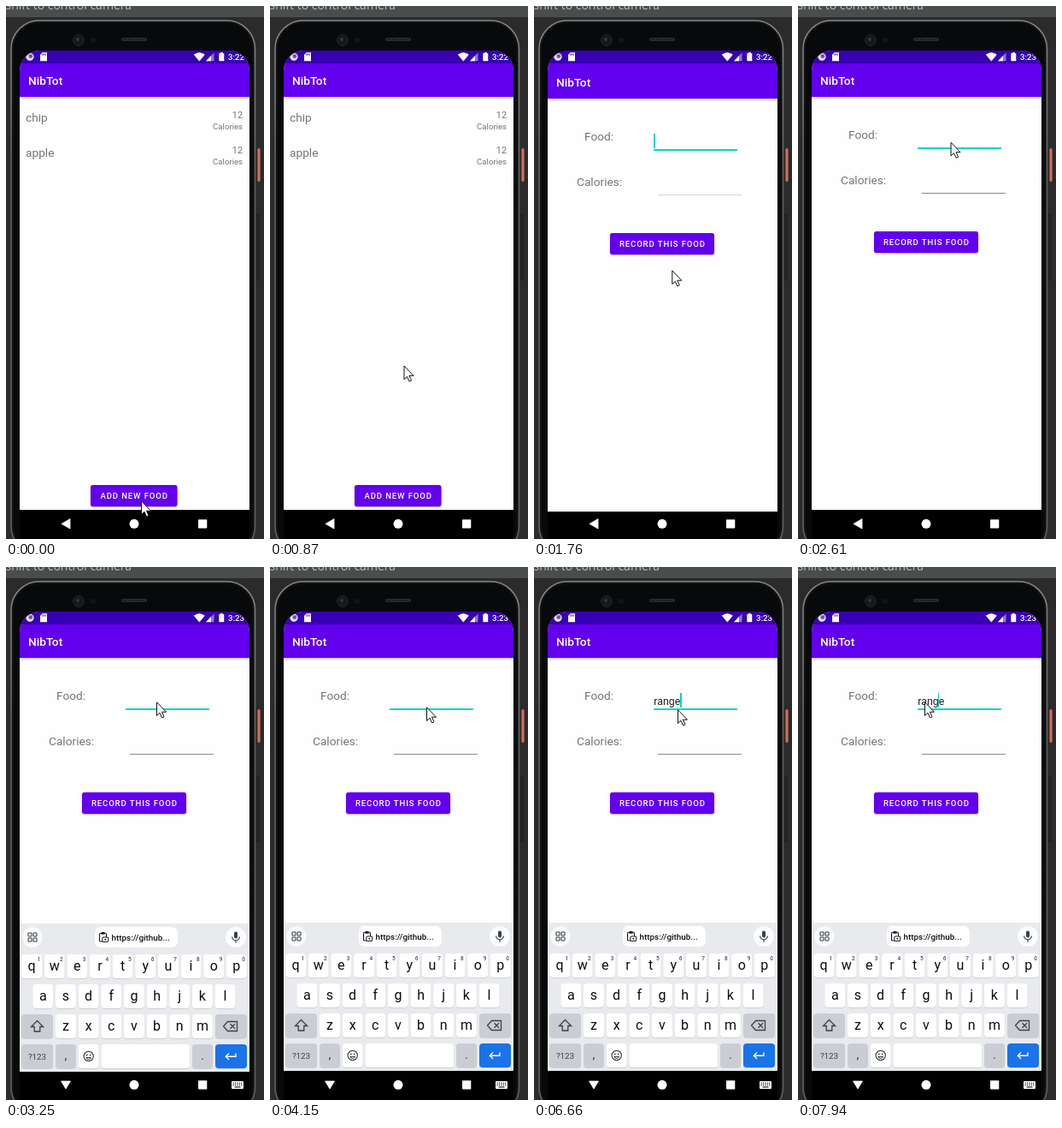
Animation of 302x622 px, one loop 8000 ms. Source, as an HTML page with a canvas:

```html
<!DOCTYPE html>
<html lang="en">
<head>
<meta charset="utf-8">
<title>Food log</title>
<style>
  html, body { margin: 0; width: 100%; height: 100%; overflow: hidden; background: #2b2b2b; }
  canvas { display: block; width: 302px; height: 622px; }
</style>
</head>
<body>
<canvas id="stage"></canvas>
<script>
const W = 302, H = 622, LOOP = 8000, STEP = 126;
const OPEN = 1640, KEYS = 3130, TYPE = 5340;
const canvas = document.getElementById('stage');
const dpr = window.devicePixelRatio || 1;
canvas.width = W * dpr;
canvas.height = H * dpr;
const c = canvas.getContext('2d');

const PURPLE = '#6200ee', DARK = '#3700b3', TEAL = '#03d6c1', GREY = '#747474';
const FONT = 'Roboto, "Noto Sans", sans-serif';

// Pointer stops: time, x, y
const stops = [[0, 158, 577], [240, 160, 585], [750, 181, 252], [1110, 136, 559],
  [1520, 136, 559], [1760, 161, 310], [2240, 183, 161], [2880, 176, 157], [3280, 176, 157],
  [3650, 183, 163], [6550, 183, 163], [6680, 168, 166], [7140, 147, 157], [LOOP, 148, 157]];

const snap = t => Math.floor((t + 30) / STEP) * STEP;

function tipAt(t) {
  const i = Math.max(1, stops.findIndex(p => p[0] > t));
  const [t0, x0, y0] = stops[i - 1], [t1, x1, y1] = stops[i];
  const k = (t - t0) / (t1 - t0), e = Math.sin(k * Math.PI / 2);
  return [x0 + (x1 - x0) * e, y0 + (y1 - y0) * e];
}

const settle = (age, from, tau) => Math.round(from * Math.exp(-Math.max(0, age) / tau));

// Half-second blink, restarted when typing ends.
function caretShown(t) {
  const since = t < TYPE ? OPEN : TYPE + 310;
  return Math.trunc((t - since) / 500) % 2 === 0;
}

function paint(fill, stroke, line) {
  if (fill) { c.fillStyle = fill; c.fill(); }
  if (stroke) { c.strokeStyle = stroke; c.lineWidth = line; c.stroke(); }
}

function rect(x, y, w, h, fill) {
  c.fillStyle = fill;
  c.fillRect(x, y, w, h);
}

function round(x, y, w, h, r, fill, stroke, line = 1) {
  c.beginPath();
  c.roundRect(x, y, w, h, r);
  paint(fill, stroke, line);
}

function disc(x, y, r, fill, stroke, line = 1) {
  c.beginPath();
  c.arc(x, y, r, 0, 7);
  paint(fill, stroke, line);
}

function poly(points, fill, stroke, line = 1) {
  c.beginPath();
  points.forEach(([x, y]) => c.lineTo(x, y));
  c.closePath();
  paint(fill, stroke, line);
}

function lines(d, stroke, line = 1) {
  c.strokeStyle = stroke;
  c.lineWidth = line;
  c.stroke(new Path2D(d));
}

function text(str, x, y, size, fill, { weight = 400, align = 'left', gap = 0, font = FONT } = {}) {
  c.font = `${weight} ${size}px ${font}`;
  c.letterSpacing = gap + 'px';
  c.textAlign = align;
  c.fillStyle = fill;
  c.fillText(str, x, y);
}

function shadowed(blur, dy, draw) {
  c.save();
  c.shadowColor = 'rgba(0,0,0,.32)';
  c.shadowBlur = blur * dpr;
  c.shadowOffsetY = dy * dpr;
  draw();
  c.restore();
}

function shifted(dy, draw) {
  c.save();
  c.translate(0, dy);
  draw();
  c.restore();
}

function desk(turning) {
  rect(0, 0, W, H, '#2b2b2b');
  rect(0, 0, W, 13, '#4a4d4e');
  const font = '"Open Sans", "Noto Sans", sans-serif';
  if (turning) text('camera with WASDQE keys, rotate with mouse', 0, 4, 14, '#bcbebf', { font });
  else text('shift to control camera', 147, 4, 14, '#bcbebf', { font, align: 'right' });
}

function phone() {
  round(293, 243, 4, 78, 2, '#222324');
  round(294.5, 166, 3, 39, 1.5, '#d9705c');
  const rim = c.createLinearGradient(0, 16, 0, 200);
  rim.addColorStop(0, '#858687');
  rim.addColorStop(1, '#5f6061');
  round(6, 17, 285.5, 623, 33, '#111213', rim, 1.6);
  round(9, 20, 279.5, 617, 30, '#08090a');
  disc(85, 40, 6.5, '#17181a', '#222427');
  disc(84, 39, 2, '#34363a');
  disc(102, 40, 3, '#141517');
  round(135, 37, 30, 4, 2, '#2b2c2e');
  for (let x = 137; x < 164; x += 3) rect(x, 38, 1, 2, '#111');
}

function navBar(keys) {
  rect(16, 588, 269, 34, '#000');
  const back = keys ? [[64.5, 600], [75.5, 600], [70, 609]] : [[75, 598.5], [75, 610], [65, 604.3]];
  poly(back, '#fff', '#fff', .8);
  disc(150, 604.3, 5.5, '#fff');
  round(225, 599.3, 10.3, 10.3, .8, '#fff');
  if (keys) {
    round(264, 600, 14, 9, 1, '#fff');
    for (let i = 0; i < 10; i++)
      rect(265.5 + i % 5 * 2.4, i < 5 ? 601.6 : 603.8, 1.2, 1.2, '#000');
    rect(267.5, 606.3, 7, 1.1, '#000');
  }
}

function statusBar(clock) {
  rect(16, 52, 269, 15, DARK);
  disc(28, 59.3, 4.6, '#e4dcf5');
  disc(28.8, 58.6, 2.3, '#6c4cc0');
  poly([[42.5, 54.3], [48, 54.3], [48, 64.2], [40, 64.2], [40, 57]], '#fff');
  for (let i = 0; i < 3; i++) rect(42.3 + i * 1.8, 55.5, .9, 2.2, DARK);
  c.beginPath();
  c.moveTo(226.3, 64.5);
  c.lineTo(219.8, 56.8);
  c.quadraticCurveTo(226.3, 51.8, 232.8, 56.8);
  c.closePath();
  paint('#fff');
  poly([[243.5, 54.5], [243.5, 64.3], [234, 64.3]], '#8f76d4');
  poly([[240, 58.1], [240, 64.3], [234, 64.3]], '#fff');
  round(249.3, 55, 6, 9.3, .8, '#fff');
  rect(251, 54, 2.6, 1.2, '#fff');
  text(clock, 260, 63, 9.6, '#fff', { weight: 500 });
}

function page() {
  rect(16, 52, 269, 536, '#fefefe');
  shadowed(3, 1, () => rect(12, 40, 277, 66, PURPLE));
  text('NibTot', 26, 92, 13.7, '#fff', { weight: 500 });
}

function button(label, x, y, w, press = 0) {
  shadowed(2 + press * 3, 1 + press * 1.5, () => round(x, y, w, 25, 2.7, PURPLE));
  if (press) {
    c.save();
    c.beginPath();
    c.roundRect(x, y, w, 25, 2.7);
    c.clip();
    rect(x, y, w, 25, `rgba(255,255,255,${.19 * press})`);
    disc(136 + 10 * press, y + 12, 42 * press, 'rgba(255,255,255,.24)');
    c.restore();
  }
  text(label, x + w / 2 + .4, y + 16.2, 9.6, '#fff', { weight: 500, align: 'center', gap: .86 });
}

function foodRow(name, y) {
  text(name, 23, y + 135, 13.7, GREY);
  text('12', 277, y + 131.3, 10.8, GREY, { align: 'right' });
  text('Calories', 277, y + 144.3, 9.6, GREY, { align: 'right' });
}

function listPage(s) {
  page();
  foodRow('chip', 0);
  foodRow('apple', 41);
  button('ADD NEW FOOD', 99, 559, 101.5, Math.min(1, Math.max(0, (s - 1140) / 360)));
}

function formPage(t) {
  page();
  text('Food:', 59, 155, 13.7, GREY);
  text('Calories:', 50, 208, 13.7, GREY);
  rect(140, 165, 98, 2, TEAL);
  rect(145, 218, 98, 1, t < OPEN + 240 ? '#d2d2d2' : '#8c8c8c');
  button('RECORD THIS FOOD', 89, 263, 122);

  const typed = 'range'.slice(0, Math.max(0, Math.floor((t - TYPE) / 96) + 1));
  text(typed, 140.3, 160.5, 12.36, '#212121');
  if (caretShown(t)) {
    const moved = t >= 7940;
    const x = Math.round(140 + c.measureText(moved ? 'rang' : typed).width);
    rect(x, 147, moved ? 1 : 2, 17, TEAL);
  }
}

function key(x, y, w, fill = '#fff') {
  round(x, y + .8, w, 28, 4, '#c5c8cc');
  round(x, y, w, 28, 4, fill);
}

function letters(row, x, y, digits) {
  [...row].forEach((ch, i) => {
    const mid = x + i * 26.65;
    key(mid - 12, y, 24);
    text(ch, mid, y + 18.7, 16, '#0c0c0d', { align: 'center' });
    if (digits) text((i + 1) % 10, mid + 8.3, y + 8.2, 6.5, '#4a4d51', { align: 'center', weight: 500 });
  });
}

function keyboard() {
  const ink = '#3c4043', mod = '#cbcdd4';
  rect(16, 415, 269, 173, '#e8eaed');

  disc(31, 431, 11.7, '#fafbfc');
  for (const x of [26, 32])
    for (const y of [426, 432]) round(x, y, 4, 4, .8, null, ink, 1.1);
  round(104, 419, 97, 24, 7, '#fff');
  round(109.5, 426.5, 8, 9.5, 1, null, '#202124', 1.2);
  rect(111.5, 425, 4, 2.8, '#202124');
  round(112.8, 431, 7, 5.5, 1.5, '#fff', '#202124', 1.1);
  disc(116.3, 433.7, 1, '#202124');
  text('https://github...', 123.5, 434.5, 9.9, '#111', { weight: 500 });
  disc(269, 431, 12, '#fafbfc');
  round(267, 424.5, 4, 8, 2, ink);
  lines('M264.7 430.5a4.3 4.3 0 0 0 8.6 0M269 435v2.8', ink, 1.2);

  letters('qwertyuiop', 30, 451, true);
  letters('asdfghjkl', 43.3, 486);
  letters('zxcvbnm', 70, 521);

  key(18, 521, 37, mod);
  lines('M36.5 528.5l7 7h-3.7v5.5h-6.6v-5.5h-3.7z', ink, 1.3);
  key(245, 521, 37, mod);
  lines('M259.5 529.5h11v11h-11l-5-5.5zM262.5 532.2l5.5 5.5M268 532.2l-5.5 5.5', ink, 1.3);

  key(18, 556, 37, mod);
  text('?123', 36.5, 573.5, 9.8, ink, { align: 'center' });
  key(58, 556, 24, mod);
  text(',', 70, 574, 15, ink, { align: 'center' });
  key(84.7, 556, 24);
  disc(96.7, 570, 5.6, null, ink, 1.2);
  for (const x of [94.7, 98.7]) disc(x, 568.5, .9, ink);
  lines('M93.7 571.5a3.2 3 0 0 0 6 0z', ink, 1);
  key(111.3, 556, 104);
  key(218, 556, 24, mod);
  text('.', 230, 574, 15, ink, { align: 'center' });
  key(245, 556, 37, '#1a73e8');
  lines('M269 566.5v3.7h-11.5M261 566.5l-3.7 3.7l3.7 3.7', '#fff', 1.4);
}

function arrow([x, y]) {
  c.save();
  c.translate(x, y);
  poly([[.5, .8], [.5, 16.5], [4, 13.2], [6.5, 18.9], [9, 17.8], [6.5, 12.2], [11.5, 12.2]],
    '#fff', '#111', 1);
  c.restore();
}

function moveCross(x, y) {
  c.save();
  c.translate(x, y);
  const arm = [[-1, 0], [-1, -4], [-3, -4], [0, -7.5], [3, -4], [1, -4], [1, 0]];
  for (const [fill, edge] of [['#fff', 2.4], ['#000', .6]])
    for (let i = 0; i < 4; i++) {
      poly(arm, fill, fill, edge);
      c.rotate(Math.PI / 2);
    }
  c.restore();
}

function draw(t) {
  const s = snap(t), keys = t >= KEYS;
  const turning = t >= 4680 && t < 5190;
  c.setTransform(dpr, 0, 0, dpr, 0, 0);
  desk(turning);
  phone();
  navBar(keys);

  c.save();
  c.beginPath();
  c.roundRect(16, 52, 269, 538, [24, 24, 0, 0]);
  c.clip();
  if (t < OPEN) listPage(s);
  else shifted(settle(s - OPEN, 18, 56), () => formPage(t));
  if (keys) shifted(settle(s - KEYS, 30, 45), keyboard);
  statusBar(t < 2490 ? '3:22' : '3:23');
  c.restore();

  if (turning) moveCross(179, 160);
  else arrow(tipAt(s));
}

const start = performance.now();
function tick() {
  draw((performance.now() - start) % LOOP);
  requestAnimationFrame(tick);
}
tick();
</script>
</body>
</html>
```
